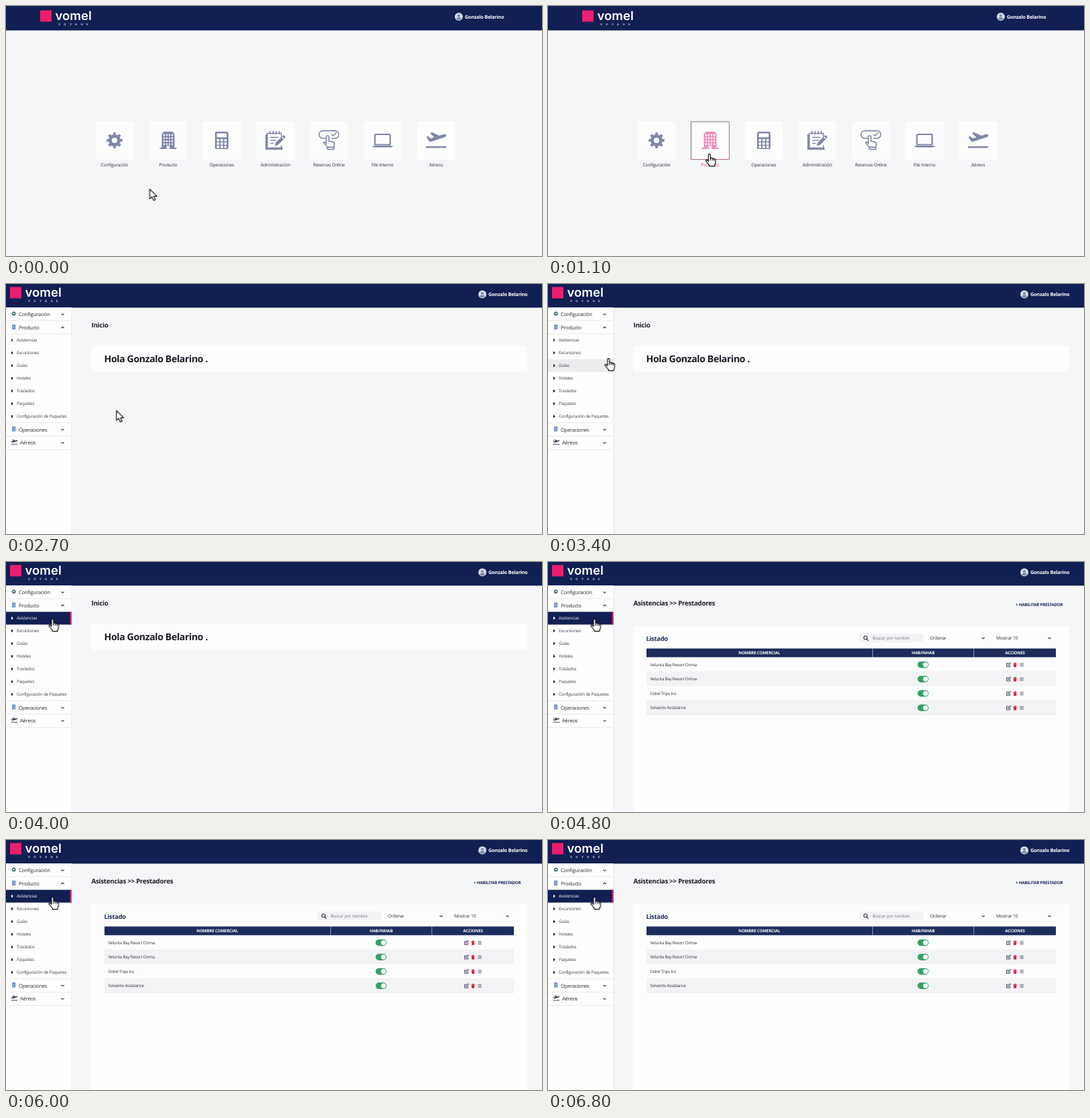
An HTML page that plays this animation: 800x374 px, repeating every 7 s.

```html
<!DOCTYPE html>
<html lang="es">
<head>
<meta charset="utf-8">
<title>Panel</title>
<style>
html, body { margin: 0; width: 100%; height: 100%; overflow: hidden; background: #f5f6f8; }
svg { display: block; width: 800px; height: 374px; font-family: "Open Sans", "Noto Sans", sans-serif; }
text { letter-spacing: -.03em; text-rendering: geometricPrecision; }
.mid { text-anchor: middle; }
.bold { font-weight: 700; }
.line { fill: none; stroke: currentColor; }
.paper { fill: #fdfdfe; }
.gap { fill: none; stroke: #fdfdfe; }
.brand text { font-family: Inter, "Noto Sans", sans-serif; letter-spacing: 0; }
.brand .sub { letter-spacing: 5.4px; }

.home, .app, .greet, .list, .hot, .hot-icon, .hot-label, .guide, .trip, .active, .first, .arrow, .hand {
  animation: 7s step-end infinite;
}
.home { animation-name: home; }
.app { animation-name: app; }
.greet { animation-name: greet; }
.list { animation-name: list; }
.hot { animation-name: hot; }
.hot-icon { animation-name: hot-icon; }
.hot-label { animation-name: hot-label; }
.guide { animation-name: guide; }
.trip { animation-name: trip; }
.active { animation-name: active; }
.first { animation-name: first; }
.arrow { animation-name: arrow; }
.hand { animation-name: hand; }
.cursor { animation: move 7s linear infinite; }

@keyframes home { 0% { opacity: 1 } 18.56%, 100% { opacity: 0 } }
@keyframes app { 0% { opacity: 0 } 18.56%, 100% { opacity: 1 } }
@keyframes greet { 0% { opacity: 0 } 18.56% { opacity: 1 } 64.27%, 100% { opacity: 0 } }
@keyframes list { 0% { opacity: 0 } 64.27%, 100% { opacity: 1 } }
@keyframes hot { 0% { opacity: 0 } 9.99%, 100% { opacity: 1 } }
@keyframes hot-icon { 0% { color: #8087a6 } 9.99%, 100% { color: #f08fc0 } }
@keyframes hot-label { 0% { fill: #2b2e3d } 9.99%, 100% { fill: #e2447f } }
@keyframes guide { 0% { opacity: 0 } 47.13% { opacity: 1 } 52.85%, 100% { opacity: 0 } }
@keyframes trip { 0% { opacity: 0 } 52.85% { opacity: 1 } 55.7%, 100% { opacity: 0 } }
@keyframes active { 0% { opacity: 0 } 55.7%, 100% { opacity: 1 } }
@keyframes first { 0% { fill: #3d3f47 } 55.7%, 100% { fill: #fff } }
@keyframes arrow { 0% { opacity: 1 } 9.99% { opacity: 0 } 18.56% { opacity: 1 } 47.13%, 100% { opacity: 0 } }
@keyframes hand { 0% { opacity: 0 } 9.99% { opacity: 1 } 18.56% { opacity: 0 } 47.13%, 100% { opacity: 1 } }
@keyframes move {
  0% { transform: translate(214.5px, 274px) }
  1.42% { transform: translate(214.5px, 274px); animation-timing-function: steps(7) }
  11.42%, 28.56% { transform: translate(241px, 221px); animation-timing-function: steps(8) }
  39.99% { transform: translate(154px, 185px); animation-timing-function: steps(5) }
  47.13%, 51.42% { transform: translate(90.5px, 111px); animation-timing-function: steps(4) }
  57.13%, 100% { transform: translate(69.5px, 85px) }
}
</style>
</head>
<body>
<svg viewBox="0 0 800 374">
  <defs>
    <g id="gear">
      <circle class="line" r="6.6" stroke-width="5"/>
      <circle class="line" r="9.8" stroke-width="4" pathLength="16" stroke-dasharray="1" stroke-dashoffset=".5"/>
    </g>
    <g id="hotel">
      <path fill="currentColor" d="M-9.5-10.5h2v-2.5h15v2.5h2v21.5h3v2h-25v-2h3z"/>
      <path class="gap" stroke-width="2.2" stroke-dasharray="2.6 2" d="M-6-9.2v16M-2-9.2v16M2-9.2v16M6-9.2v16"/>
      <path class="paper" d="M-2.2 13v-5h4.4v5z"/>
    </g>
    <g id="calc">
      <rect x="-10" y="-13" width="20" height="26" rx="2.6" fill="currentColor"/>
      <rect class="paper" x="-7.4" y="-10.4" width="14.8" height="6" rx=".8"/>
      <path class="gap" stroke-width="3.6" stroke-dasharray="3.6 2" d="M-7.4-.2h15M-7.4 4.9h15M-7.4 9.7h15"/>
    </g>
    <g id="notes" fill="currentColor">
      <path class="line" stroke-width="1.5" d="M9-4v-6.5h-21v22h21v-4"/>
      <path class="line" stroke-width="1.6" d="M-8-14v5M-3.4-14v5M1.2-14v5M5.8-14v5"/>
      <path class="line" stroke-width="1.3" d="M-7.5-4.5h12M-7.5 0h9M-7.5 4.5h5"/>
      <path class="line" stroke-width="3.2" d="M-13.2-9v21.4h24"/>
      <path d="M-1 8.4l1.3-4.8 8.6-8.6 3.5 3.5-8.6 8.6zM9.9-6l1.3-1.3q1-.8 2 0l1.4 1.5q.8 1 0 1.9l-1.2 1.4z"/>
    </g>
    <g id="touch" class="line" stroke-width="1.6" stroke-linejoin="round" stroke-linecap="round">
      <path d="M-5-3h-4a5.7 5.7 0 0 1 0-11.4h18a5.7 5.7 0 0 1 0 11.4h-5"/>
      <path d="M4-9l2.3 2.3 4.5-4.6"/>
      <path d="M-4 5v-11q2-2.6 4 0v7l6.5 1.6q1.8.8 1.7 2.6l-.9 5h-9.5l-6-6.7q1.3-2.2 4.2.8"/>
      <path d="M-2.3 10.5h9.8v3h-9.8z"/>
    </g>
    <g id="laptop">
      <rect class="line" x="-11.4" y="-9" width="22.8" height="15.5" rx="1.5" stroke-width="2.2"/>
      <path fill="currentColor" d="M-15 8h30v.6q-.4 1.8-2.2 1.8h-25.6q-1.8 0-2.2-1.8z"/>
    </g>
    <g id="plane" fill="currentColor">
      <path d="M-15 8.8h30v2.6h-30z"/>
      <path d="M-14.5-5.5l2.3-.7 4 3.3 5.4-1.7-6.6-6.3 3.6-1.1 10.4 5.1 6.5-2.1q3.2-.7 4 1.3.4 2-2.3 3l-20.6 6.7q-2 .4-3-1z"/>
    </g>
    <g id="block">
      <rect x="-2.7" y="-3.6" width="5.4" height="7.2" rx=".8" fill="#6c8bbd"/>
      <path d="M-1.6-2v4.4M0-2v4.4M1.6-2v4.4" stroke="#b5c6e2" stroke-width=".7"/>
    </g>
    <g id="user">
      <circle r="6" fill="#d5dae6"/>
      <circle cy="-1.6" r="2" fill="#7f8aa8"/>
      <path fill="#7f8aa8" d="M-3.8 3.8q.4-3 3.8-3t3.8 3q-3.8 2.6-7.6 0z"/>
    </g>
    <g id="logo">
      <rect x="51" y="6.5" width="17" height="17" fill="#ea1f6f"/>
      <g class="brand" fill="#fff">
        <text x="73.5" y="20.6" font-size="18.5" font-weight="600">vomel</text>
        <text class="sub" x="78" y="28.8" font-size="4.4" font-weight="500">VOYAGE</text>
      </g>
    </g>
    <path id="down" d="M-2.1-1l2.1 2 2.1-2" fill="none" stroke="#2b2e3d" stroke-width="1.1"/>
    <g id="switch">
      <rect x="-8.2" y="-4.8" width="16.4" height="9.6" rx="4.8" fill="#35a067"/>
      <circle cx="3.6" r="3.6" fill="#fff"/>
    </g>
    <g id="tools">
      <path d="M-9.5-2.2h-3v5h5v-2.6M-10.6.8l.3-1.4 3-3 1.1 1.1-3 3z" fill="none" stroke="#33384d" stroke-width=".9"/>
      <path d="M-2.6-2.6h5.2v1h-5.2zM-1-3.4h2v1h-2zM-2.2-1.2h4.4l-.3 4.6h-3.8z" fill="#e0263f"/>
      <path d="M7.4-2h5.4M7.4 0h5.4M7.4 2h5.4" stroke="#4a4d58" stroke-width=".8"/>
    </g>
  </defs>
  <rect width="800" height="374" fill="#f5f6f8"/>
  <g id="stage"></g>
  <g class="cursor" stroke="#111" stroke-width="1.2" stroke-linejoin="round" fill="#fff">
    <path class="arrow" d="M0 0v14.6l3.4-3.1 2.5 5.4 2.5-1.1-2.4-5.2h4.8z"/>
    <path class="hand" d="M-1.6 11.3V1.4q1.5-2.2 3 0V6.6q1.9-1 2.8.5 1.8-.8 2.6.6 1.8-.4 2.1 1.4v4.2q-.2 2.4-1.4 3.4v2H-.3v-1.9L-5.2 11.2q-.8-2 1.2-2.2zM1.4 6.6V10M4.2 7.1V10.3M6.8 7.7V10.6"/>
  </g>
</svg>
<script>
const user = 'Gonzalo Belarino';
const navy = '#111f52';

const text = (x, y, size, str, cls = '', fill = '#2b2e38') =>
  `<text x="${x}" y="${y}" font-size="${size}" class="${cls}" fill="${fill}">${str}</text>`;
const rect = (x, y, w, h, fill, cls = '') =>
  `<rect x="${x}" y="${y}" width="${w}" height="${h}" fill="${fill}" class="${cls}"/>`;
const icon = (id, x, y, scale = 1, color = '#8087a6') =>
  `<use href="#${id}" transform="translate(${x} ${y}) scale(${scale})" color="${color}"/>`;
const group = (cls, ...parts) => `<g class="${cls}">${parts.flat().join('')}</g>`;
const title = (x, y, size, str) => text(x, y, size, str, 'bold', '#1c1e26');

const header = (h, x, y) =>
  rect(0, 0, 800, h, navy) + icon('user', x, y) +
  text(x + 9, y + 2.6, 7.3, user, 'bold', '#fff');

const tiles = [
  ['gear', 'Configuración'], ['hotel', 'Producto'], ['calc', 'Operaciones'],
  ['notes', 'Administración'], ['touch', 'Reservas Online'],
  ['laptop', 'File Interno'], ['plane', 'Aéreos']
].map(([id, label], i) => {
  const x = 162 + i * 80, hot = id === 'hotel';
  const art = hot
    ? `<g class="hot-icon"><use href="#hotel" x="${x}" y="201"/></g>`
    : icon(id, x, 201);
  return rect(x - 28.3, 172.8, 56.8, 56.8, '#fdfdfe') + art +
    text(x, 240.4, 6.7, label, hot ? 'mid hot-label' : 'mid');
});

const home = group('home',
  header(36.5, 675.8, 16), icon('logo', 0, 0), tiles,
  `<g class="hot" fill="none"><path d="M213.5 229.5v-56.5h57" stroke="#74717c"/>
   <path d="M213.5 229.5h57v-56.5" stroke="#b5688a"/></g>`);

const section = (y, label, x = 19) =>
  text(x, y + 2.8, 7.65, label) + rect(0, y + 9.3, 97.5, .8, '#e3e4e8');

const subs = ['Asistencias', 'Excursiones', 'Guías', 'Hoteles', 'Traslados',
  'Paquetes', 'Configuración de Paquetes'].map((label, i) => {
  const y = 84 + i * 19, cls = i ? '' : 'first';
  return `<path class="${cls}" fill="#222" d="M8 ${y - 2.6}l3 2.6-3 2.6z"/>` +
    text(16, y + 2.4, 6.35, label, cls, '#3d3f47');
});

const sidebar = [
  rect(97.5, 35, 1.2, 339, '#e9eaee'), rect(0, 35, 97.5, 339, '#fefefe'),
  icon('gear', 11.7, 44.2, .28, '#3c6367'), section(45.2, 'Configuración'),
  icon('block', 11.7, 64.4), section(65, 'Producto'),
  icon('block', 11.7, 216.9), section(217.8, 'Operaciones'),
  icon('plane', 12.5, 236.6, .32, '#1c1e28'), section(237.6, 'Aéreos', 21),
  rect(0, 207.3, 97.5, .8, '#e3e4e8'),
  icon('down', 84.5, 45.3), icon('down', 84.5, 65, -1),
  icon('down', 84.5, 217.8), icon('down', 84.5, 237.6),
  rect(0, 112.5, 97.5, 19, '#ececee', 'guide'),
  rect(0, 93.5, 97.5, 19, '#ececee', 'trip'),
  group('active', rect(0, 74.6, 97.5, 19, navy), rect(95.6, 74.6, 1.9, 19, '#d8246c')),
  subs
];

const greet = group('greet',
  title(127.5, 65.3, 9.8, 'Inicio'),
  rect(127.5, 92.5, 650, 39, '#fdfdfe'),
  title(146.5, 117.2, 14.2, `Hola ${user} .`));

const rows = ['Velunta Bay Resort Orima', 'Velunta Bay Resort Orima',
  'Odrel Trips Inc', 'Solvanto Assistance'].map((name, i) => {
  const y = 153.4 + i * 21.5;
  return rect(147, y - 10.8, 611, 21.5, i % 2 ? '#f3f3f5' : '#fdfdfe') +
    rect(147, y + 10.3, 611, .5, '#e6e7eb') +
    text(152.5, y + 2.2, 6.2, name) +
    icon('switch', 559.8, y + .2) + icon('tools', 697, y + .4);
});

const heads = [[315.3, 'NOMBRE COMERCIAL'], [560, 'HAB/INHAB'], [697, 'ACCIONES']]
  .map(([x, label]) => text(x, 138.3, 6.2, label, 'mid bold', '#fff'));

const list = group('list',
  title(127.5, 65.3, 9.8, 'Asistencias &gt;&gt; Prestadores'),
  text(698, 66.3, 6.15, '+ HABILITAR PRESTADOR', 'bold', '#1a2757'),
  rect(127.5, 96, 650, 278, '#fdfdfe'),
  text(146.5, 117.8, 9.4, 'Listado', 'bold', '#1c2b5e'),
  rect(464.5, 107, 95.5, 13, '#f2f3f5'),
  '<path d="M476 115.5l2.3 2.3M476.4 113.2a2.5 2.5 0 1 1-5 0a2.5 2.5 0 1 1 5 0" fill="none" stroke="#2b2e3d" stroke-width="1.1"/>',
  text(484.5, 116.1, 6.45, 'Buscar por nombre', '', '#74777f'),
  text(570, 116.1, 6.65, 'Ordenar'), icon('down', 649.5, 113.8),
  text(669, 116.1, 6.75, 'Mostrar 10'), icon('down', 748.5, 113.8),
  rect(147, 129.4, 611, 13.3, '#1c2c5b'),
  rect(484, 129.4, .8, 13.3, '#aab1c8'), rect(635.3, 129.4, .8, 13.3, '#aab1c8'),
  heads, rows);

document.getElementById('stage').innerHTML =
  home + group('app', header(35.4, 711, 15.5), icon('logo', -45, -2), sidebar, greet, list);
</script>
</body>
</html>
```
